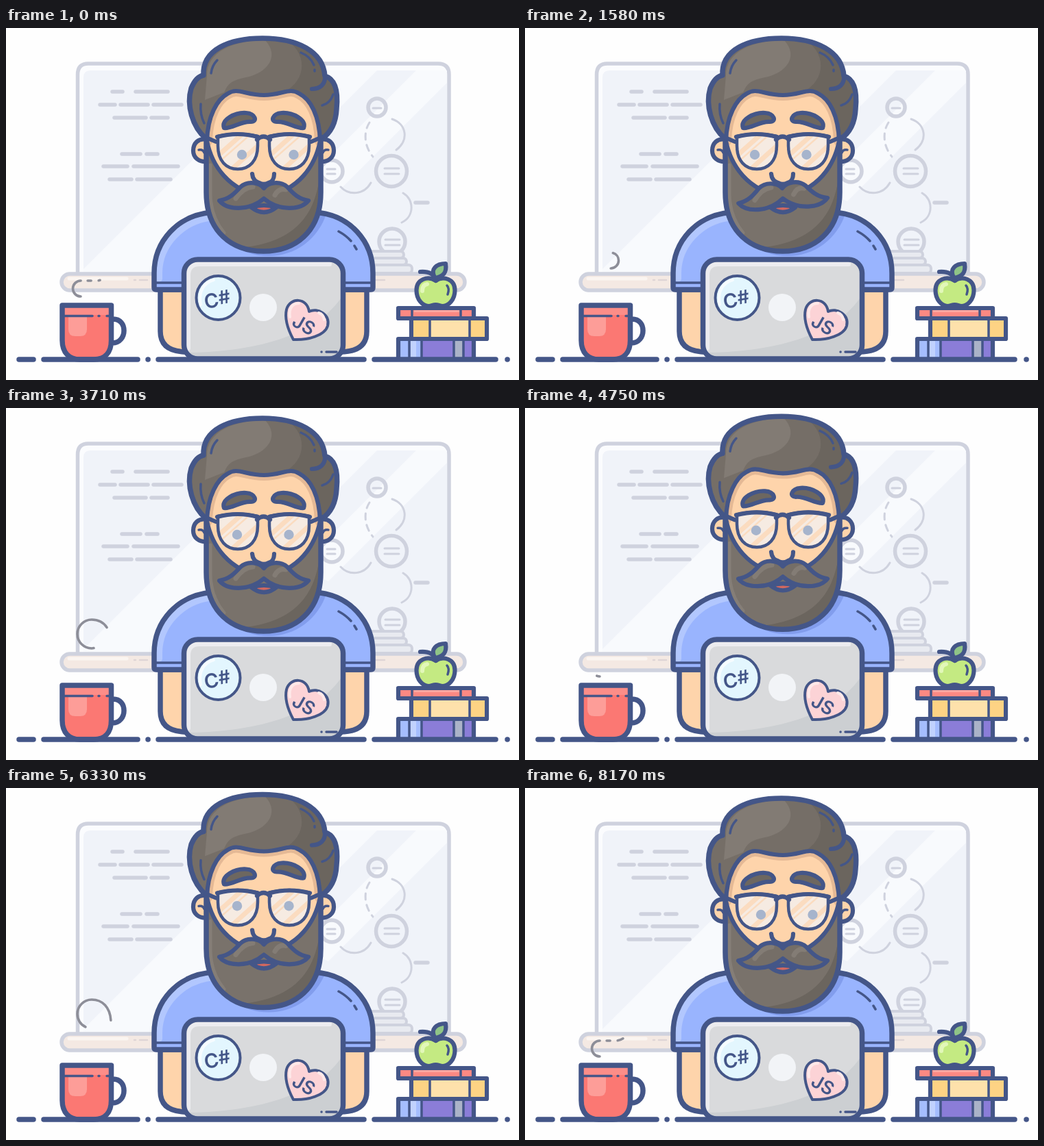
Write an HTML page that moves like this. It is 748 by 514 pixels and loops after 8210 ms.

```html
<!DOCTYPE html>
<html lang="en">
<head>
<meta charset="utf-8">
<title>Developer at a desk</title>
<style>
html, body { margin: 0; width: 100%; height: 100%; overflow: hidden; background: #fefefe; }
svg { display: block; width: 748px; height: 514px; }
.o { stroke: #445688; stroke-width: 7.5; }
.m { stroke: #445688; stroke-width: 6.2; }
.t { stroke: #445688; stroke-width: 3.5; }
.g { stroke: #cfd2de; stroke-width: 5.5; }
.h { stroke: #cfd2de; stroke-width: 3; }
.steam { stroke: #8d8e98; stroke-width: 3.6; }
text { font: 600 29px Inter, Roboto, sans-serif; fill: #445688; text-anchor: middle; }
</style>
</head>
<body>
<svg viewBox="0 0 748 514" fill="none" stroke-linecap="round" stroke-linejoin="round">
<defs>
  <path id="fringe" d="M293 165C294 128 308 104 323 96C338 86 348 98 376 98C403 98 413 86 428 96C444 104 457 128 458 165"/>
  <path id="skin" d="M293 165C294 128 308 104 323 96C338 86 348 98 376 98C403 98 413 86 428 96C444 104 457 128 458 165C451 200 428 238 376 246C324 238 300 200 293 165Z"/>
  <path id="beard" d="M292 160V240C292 298 330 326 375.5 326S459 298 459 240V160Z"/>
  <path id="shirt" d="M216 379V358C216 312 250 272 303 269H449C502 272 535 312 535 358V379Q535 382 532 382H219Q216 382 216 379Z"/>
  <path id="lens" d="M309 158Q338 151 367 158V172C367 194 355 206 338 206S309 194 309 172Z"/>
  <path id="stache" d="M376 234C369 225 352 223 342 232C333 242 325 250 311 252C322 266 354 268 376 249C398 268 430 266 441 252C427 250 419 242 410 232C400 223 383 225 376 234Z"/>
  <path id="hair" d="M292 162C271 144 263 112 270 88C275 76 282 70 288 69C286 32 325 15 374 15C425 15 462 34 465 70C482 75 484 98 482 118C481 139 474 153 460 162Z"/>
  <path id="steamLine" d="M109 392A11.5 11.5 0 0 1 109 369H131C144 369 153 360 153 343C153 322 142 309 125 309A21 21 0 0 0 125 351A11.5 11.5 0 0 0 125 328"/>
  <g id="ear">
    <path class="m" fill="#fed4ab" d="M293 163C280 160 273 169 273 179S281 196 293 195Z"/>
    <path class="t" d="M281 178Q287 177 289 182"/>
  </g>
  <path id="brow" class="m" fill="#6d6760" d="M318 146C313 134 334 123 350 124C364 125 367 137 357 137C342 136 330 147 318 146Z"/>
  <path id="arm" class="o" fill="#fed4ab" d="M225 382V443C225 463 238 473 264 473V382Z"/>
  <g id="glass">
    <use href="#lens" fill="#f6ebe2"/>
    <g clip-path="url(#lensClip)" stroke="#fbdcc0">
      <path stroke-width="7" d="M305 190L350 150M326 209L376 164"/>
      <path stroke-width="2.5" d="M308 198L358 154"/>
    </g>
  </g>
  <g id="rim">
    <use href="#lens" stroke="#445688" stroke-width="4.5"/>
    <path class="m" d="M292 160L306 166M308 159Q338 151 367 159"/>
  </g>
  <clipPath id="skinClip"><use href="#skin"/></clipPath>
  <clipPath id="beardClip"><use href="#beard"/></clipPath>
  <clipPath id="shirtClip"><use href="#shirt"/></clipPath>
  <clipPath id="lensClip"><use href="#lens"/></clipPath>
  <clipPath id="stacheClip"><use href="#stache"/></clipPath>
  <clipPath id="hairClip"><use href="#hair"/></clipPath>
  <clipPath id="lidClip"><rect x="259.500" y="338" width="232" height="145" rx="20"/></clipPath>
</defs>

<!-- whiteboard -->
<path class="g" fill="#fbfcfe" d="M104.500 360V68Q104.500 52 120 52H630Q646 52 646 68V360Z"/>
<path fill="#f0f3f9" d="M113 358V72Q113 62 123 62H643V358Z"/>
<path fill="#f8fafd" d="M113 352L403 62H541L245 358H113ZM427 233L598 62H643V80L470 253Z"/>
<path class="g" d="M155 93H170M189 93H236M137 112H159M167 112H207M215 112H256M158 131H204M212 131H236M169 184H196M205 184H221M142 202H177M186 202H251M151 221H183M191 221H240M597 255H615"/>
<g class="g">
  <circle cx="541" cy="116" r="13"/><circle cx="562" cy="209" r="22.5"/>
  <circle cx="475" cy="209" r="16"/><circle cx="563" cy="312" r="19"/>
</g>
<path class="h" d="M535 117H547M552 205H573M552 213H573M468 206H480M468 213H480M553 309H574M553 317H574M563 133C584 140 588 164 569 178M488 232C500 245 522 244 532 226M579 241C595 250 596 275 577 284"/>
<path class="h" stroke-dasharray="9 8" d="M530 138C521 152 522 172 535 188"/>
<g fill="#e8eaf0" stroke="#cfd2de" stroke-width="4">
  <rect x="500" y="326" width="80" height="10" rx="5"/>
  <rect x="500" y="336" width="84" height="10" rx="5"/>
  <rect x="500" y="346" width="92" height="12" rx="5"/>
</g>
<rect class="g" x="81" y="359" width="588" height="24" rx="12" fill="#f4e9e3"/>
<path stroke="#fbf5f1" stroke-width="5" d="M92 366H176"/>
<path stroke="#dfd5d6" stroke-width="2.5" d="M187 368H189M195 368H206M537 368H552"/>

<path class="steam"/>
<path class="steam"/>

<!-- body -->
<use href="#arm"/><use href="#arm" transform="matrix(-1 0 0 1 751 0)"/>
<use href="#shirt" fill="#99b4fe"/>
<g clip-path="url(#shirtClip)">
  <path stroke="#b2c7fe" stroke-width="10" d="M223 366V358C223 318 256 279 305 276"/>
  <path id="shade" fill="#829ded" d="M297 262C306 306 340 333 383 333C424 333 459 306 470 262Z"/>
</g>
<use href="#shirt" class="o"/>
<path class="t" d="M217 372H258M493 372H535M485 297Q496 303 503 311M508 318L511 323"/>

<g id="head">
  <use href="#ear"/><use href="#ear" transform="matrix(-1 0 0 1 751 0)"/>
  <use href="#hair" fill="#756e67"/>
  <g clip-path="url(#hairClip)">
    <path fill="#827b74" d="M293 70C293 35 330 18 378 18C400 42 380 66 350 72C325 77 323 84 318 94L290 105Z"/>
    <path fill="#6b655e" d="M405 15C440 35 440 75 405 94L452 128L462 164L490 140V80L462 20Z"/>
  </g>
  <use href="#hair" class="o"/>
  <use href="#beard" fill="#79726b"/>
  <g clip-path="url(#beardClip)">
    <path fill="#6b655e" d="M459 200C455 270 425 310 350 320L376 330H460Z"/>
    <path stroke="#857e77" stroke-width="5" d="M298 200V245C299 270 307 286 318 299"/>
  </g>
  <use href="#beard" class="o"/>
  <use href="#skin" fill="#fed4ab"/>
  <g clip-path="url(#skinClip)">
    <use href="#fringe" stroke="#e5b995" stroke-width="16"/>
  </g>
  <use href="#skin" class="m"/>
  <path class="m" d="M465 70C466 82 458 89 446 89"/>
  <path class="t" d="M299 66C300 58 303 52 308 47M430 36C440 40 446 47 449 54M450 61V63M284 111C283 122 285 131 289 139M477 97C474 106 469 111 461 113"/>

  <use href="#brow"/>
  <g id="browR"><use href="#brow" transform="matrix(-1 0 0 1 752 0)"/></g>
  <use href="#glass"/><use href="#glass" x="75"/>
  <g id="eyes" fill="#a6b4cc"><circle cx="337" cy="185" r="7.2"/><circle cx="412.500" cy="185" r="7.2"/></g>
  <use href="#rim"/><use href="#rim" transform="matrix(-1 0 0 1 751 0)"/>
  <path class="m" d="M366 163Q375.500 154 385 163"/>
  <path class="m" fill="#d2685f" d="M358 262Q376 256 394 262Q376 276 358 262Z"/>
  <g id="mouth">
    <use href="#stache" fill="#756e67"/>
    <g clip-path="url(#stacheClip)">
      <path stroke="#837c75" stroke-width="7" d="M335 249Q346 233 360 232M392 244Q398 233 408 236"/>
    </g>
    <use href="#stache" class="m"/>
  </g>
  <path class="m" fill="#fed4ab" d="M359 213C360 224 367 225 369 226Q376 230 383 226C385 225 391 224 391 213"/>
</g>

<!-- laptop -->
<g clip-path="url(#lidClip)">
  <path fill="#d9dadc" d="M255 335H496V486H255Z"/>
  <path fill="#cccfd2" d="M258 474C360 474 460 450 496 382V486H258Z"/>
  <path stroke="#ececef" stroke-width="6" d="M266 468V361Q266 345 282 345H472"/>
</g>
<circle cx="375" cy="408" r="20" fill="#f2f4f7"/>
<path class="t" d="M460 473H460.100M467 473H482"/>
<circle cx="309.500" cy="394" r="32" fill="#e3f6fe" stroke="#445688" stroke-width="4"/>
<path stroke="#f6fcff" stroke-width="4" d="M284 404C280 386 288 372 303 368"/>
<text x="308" y="407" transform="rotate(-10 309 396)">C<tspan dy="-3" font-size="27">#</tspan></text>
<path fill="#fcd3d6" stroke="#445688" stroke-width="4" d="M419 455C411 440 406 424 409 411C414 393 439 393 442 414C454 408 473 418 469 435C465 449 440 456 419 455Z"/>
<path stroke="#fee9e9" stroke-width="4" d="M414 422C412 409 418 402 427 402M456 416Q463 418 464 426"/>
<text x="434" y="443" transform="rotate(30 434 434)" style="font-size:27px">JS</text>
<rect class="o" x="259.500" y="338" width="232" height="145" rx="20"/>

<!-- mug -->
<path fill="#fb7873" d="M82 405H154V456C154 474 144 484 128 484H108C92 484 82 474 82 456Z"/>
<path fill="#fc8d88" d="M84 408H152V419H84Z"/>
<path fill="#fd9d98" d="M91 421H118V440Q118 450 108 450H101Q91 450 91 440Z"/>
<path class="o" d="M82 405H153.500V456C153.500 474 144 484 128 484H108C92 484 82 474 82 456ZM156 425C167 425 172 433 172 442S166 460 155 460"/>
<path class="t" d="M84 420.500H126M135 420.500H136M147 420.500H151"/>

<!-- books and fruit -->
<path fill="#8b7dd8" d="M573 454H683V484H573Z"/>
<path fill="#a5bdfe" d="M575 455H605V484H575Z"/>
<path fill="#c1d2fe" d="M590 457H598V484H590Z"/>
<path fill="#abb3c8" d="M653 455H666V484H653Z"/>
<path class="m" d="M572 484V454H682V484"/>
<path class="t" d="M588 456V482M606 456V482M653 456V482M667 456V482"/>
<path class="m" fill="#fee1ab" d="M591 424H701V454H591Z"/>
<path fill="#fdd384" d="M677 427H698V451H677ZM594 427H617V451H594Z"/>
<path class="t" d="M618 426V452M676 426V452"/>
<path class="m" fill="#fc8983" d="M572 409H682V424H572Z"/>
<path fill="#fda7a1" d="M595 412H661V415H595Z"/>
<path class="t" d="M592 411V422M663 411V422"/>
<path class="m" fill="#c4ea82" d="M626.500 369C615 361 598.500 367 598.500 383C598.500 397 608 406 616 406C621 406 622 404 626.500 404S632 406 637 406C645 406 654.500 397 654.500 383C654.500 367 638 361 626.500 369Z"/>
<path stroke="#e2f7b9" stroke-width="6" d="M607 384Q607 375 614 374"/>
<path class="t" d="M643 376Q647 380 644 389"/>
<path class="m" d="M604 356C617 355 625 360 627 369"/>
<path class="m" fill="#8fc487" d="M625 364C618 352 628 344 641 344C643 357 638 363 625 365Z"/>

<path class="o" d="M19 484H40M55 484H192M207 484H207.100M222 484H522M537 484H714M731 484H731.100"/>
</svg>
<script>
const LOOP = 8210, PUFF = 2710;
const $ = id => document.getElementById(id);
const puffs = document.querySelectorAll('.steam');
const inkRuns = [[0, 36], [46, 51], [62, 244]];
puffs.forEach(p => p.setAttribute('d', $('steamLine').getAttribute('d')));

const smooth = k => k * k * (3 - 2 * k);
const linear = k => k;

// Value at time t on a list of [time, value] keys
function track(t, keys, ease = smooth) {
  if (t <= keys[0][0]) return keys[0][1];
  for (let i = 1; i < keys.length; i++) {
    const [a, from] = keys[i - 1], [b, to] = keys[i];
    if (t <= b) return from + (to - from) * ease((t - a) / (b - a));
  }
  return keys[keys.length - 1][1];
}

const steamHead = [[0, 0], [300, 6], [630, 31], [750, 47], [880, 63], [930, 71], [1400, 146], [1880, 214], [2250, 244]];
const steamTail = [[1050, 0], [1300, 9], [1550, 45], [1880, 119], [2460, 211], [2710, 235], [2900, 245]];

function drawPuff(path, p) {
  const head = track(p, steamHead, linear), tail = track(p, steamTail, linear);
  const runs = inkRuns.map(([a, b]) => [Math.max(a, tail), Math.min(b, head)]).filter(([a, b]) => b > a);
  path.style.display = runs.length ? '' : 'none';
  if (!runs.length) return;
  const dashes = runs.flatMap(([a, b], i) => [b - a, i + 1 < runs.length ? runs[i + 1][0] - b : 999]);
  path.setAttribute('stroke-dasharray', dashes.join(' '));
  path.setAttribute('stroke-dashoffset', -runs[0][0]);
}

const move = (id, x, y, extra = '') => $(id).setAttribute('transform', `translate(${x} ${y})${extra}`);

// Rise to a first height, creep up to a second, then settle back
const raise = (t, first, second) => track(t, [[4250, 0], [5170, first], [5750, second], [7200, second], [8100, 0]]);

function draw(t) {
  const p = (t + 885) % PUFF;
  drawPuff(puffs[0], p);
  drawPuff(puffs[1], p + PUFF);

  const lift = raise(t, -4.7, -5.5);
  move('head', 0, lift);
  move('shade', 0, lift);
  move('browR', 0, raise(t, -8, -9));
  move('eyes',
    track(t, [[600, 7], [1500, -2], [1700, -2], [2400, -4], [2600, -4], [3600, 0], [7300, 0], [8150, 7]]),
    raise(t, -6.3, -7.3));
  const tilt = track(t, [[1100, 0], [1560, -3.5], [1640, -3.5], [2100, 0]]);
  move('mouth', track(t, [[1700, 0], [2500, -2], [2700, -2], [3500, 0]]), 0, ` rotate(${tilt} 376 250)`);
}

function tick() {
  draw(performance.now() % LOOP);
  requestAnimationFrame(tick);
}
tick();
</script>
</body>
</html>
```
